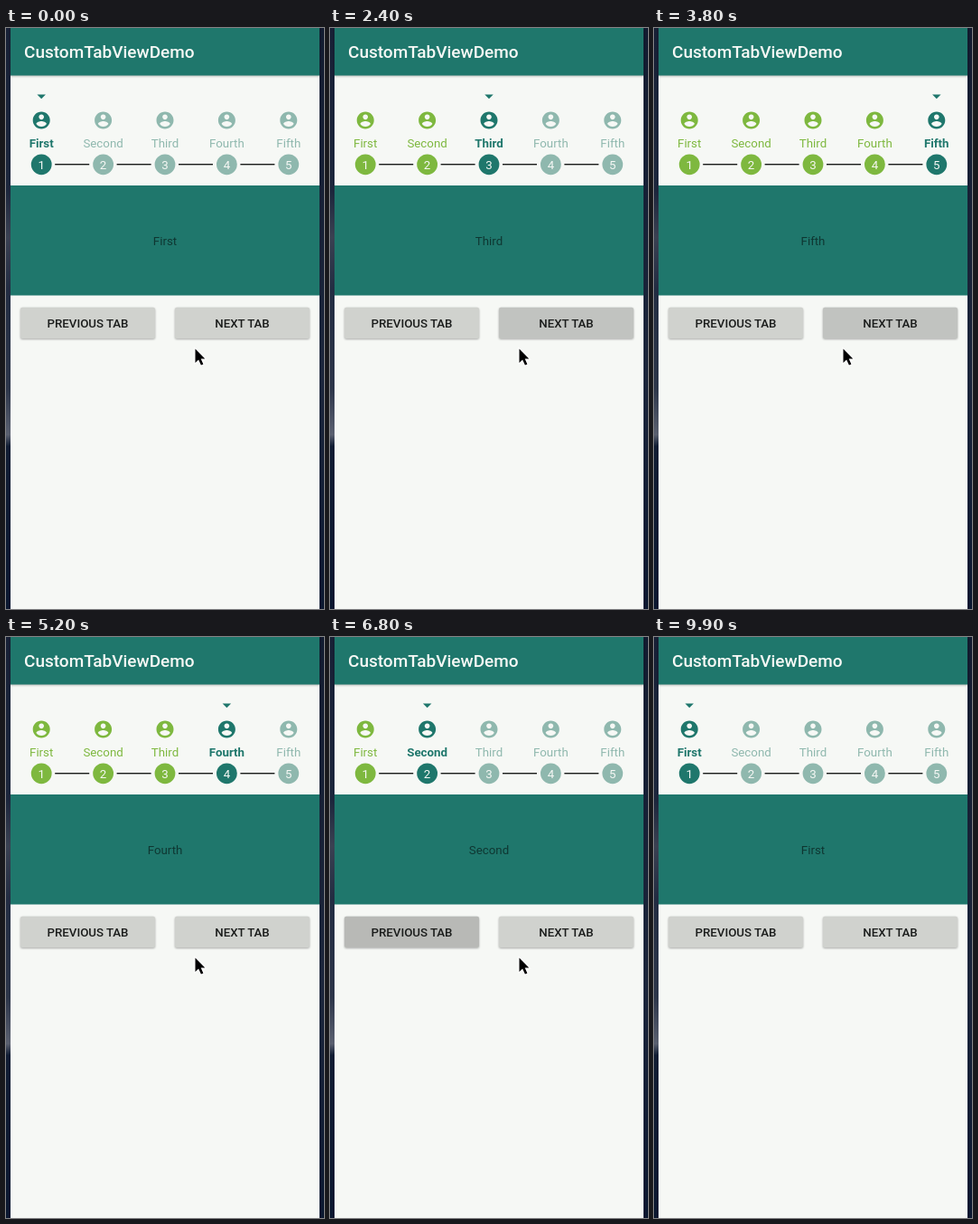
These frames come from a looping animation (352 by 642 pixels, 10 s). An HTML page:

```html
<!DOCTYPE html>
<html lang="en">
<head>
<meta charset="utf-8">
<title>Tab view demo</title>
<style>
html, body { margin: 0; width: 100%; height: 100%; overflow: hidden; background: #f6f8f5; }
svg { display: block; width: 352px; height: 642px; font: 13.3px Roboto, sans-serif; }
.mid { text-anchor: middle; }
.btn { filter: drop-shadow(0 1px 1px rgba(0,0,0,.32)); }
.btn.down { filter: drop-shadow(0 1px 2px rgba(0,0,0,.5)); }
.bar { filter: drop-shadow(0 1px 1px rgba(0,0,0,.25)); }
</style>
</head>
<body>
<svg id="stage" viewBox="0 0 352 642">
  <defs>
    <linearGradient id="left" x2="0" y2="1">
      <stop offset="0" stop-color="#172036"/>
      <stop offset=".28" stop-color="#1c263c"/>
      <stop offset=".36" stop-color="#3a4152"/>
      <stop offset=".45" stop-color="#222c42"/>
      <stop offset=".62" stop-color="#2c3549"/>
      <stop offset=".7" stop-color="#5a6070"/>
      <stop offset=".72" stop-color="#101c33"/>
      <stop offset="1" stop-color="#0a1730"/>
    </linearGradient>
    <linearGradient id="right" x2="0" y2="1">
      <stop offset="0" stop-color="#121b30"/>
      <stop offset=".6" stop-color="#1b253b"/>
      <stop offset="1" stop-color="#0a1730"/>
    </linearGradient>
  </defs>
  <rect width="5" height="642" fill="url(#left)"/>
  <rect x="347" width="5" height="642" fill="url(#right)"/>
  <rect x="5" width="342" height="642" fill="#f6f8f5"/>
  <rect class="bar" x="5" width="342" height="52.5" fill="#1f776c"/>
  <text x="20" y="33.3" font-size="19" font-weight="500" fill="#f6f8f5">CustomTabViewDemo</text>
  <rect x="5" y="174" width="342" height="121.5" fill="#1f776c"/>
</svg>
<script>
const stage = document.getElementById('stage');
const TABS = ['First', 'Second', 'Third', 'Fourth', 'Fifth'];
const ACTIVE = '#1f776c', DONE = '#7eb83f', TODO = '#8fb8ae', PAPER = '#f6f8f5';
const ICON = 'M12 2C6.48 2 2 6.48 2 12s4.48 10 10 10 10-4.48 10-10S17.52 2 12 2z' +
  'm0 3c1.66 0 3 1.34 3 3s-1.34 3-3 3-3-1.34-3-3 1.34-3 3-3z' +
  'm0 14.2c-2.5 0-4.71-1.28-6-3.22.03-1.99 4-3.08 6-3.08 1.99 0 5.97 1.09 6 3.08-1.29 1.94-3.5 3.22-6 3.22z';

// Press times; +1 is the next button, -1 the previous one
const PRESSES = [[1300, 1], [2000, 1], [2700, 1], [3400, 1],
  [4600, -1], [5900, -1], [6500, -1], [7100, -1]];
const LOOP = 10000, CLICK_DELAY = 150, CURSOR_END = 7000;

function add(tag, attrs, text, parent = stage) {
  const el = document.createElementNS('http://www.w3.org/2000/svg', tag);
  for (const key in attrs) el.setAttribute(key, attrs[key]);
  if (text) el.textContent = text;
  return parent.appendChild(el);
}

const tabX = i => 39.2 + 68.4 * i;
const tabs = TABS.map((name, i) => {
  const x = tabX(i), g = add('g', { class: 'mid' });
  add('path', { d: ICON, transform: `translate(${x - 11.4} 90.7) scale(.95)` }, '', g);
  const label = add('text', { x, y: 131.6 }, name, g);
  add('circle', { cx: x, cy: 150.8, r: 11.4 }, '', g);
  add('text', { x, y: 155.5, fill: PAPER }, String(i + 1), g);
  if (i) add('rect', { x: x - 53.4, y: 150, width: 38, height: 1.4, fill: '#1a1c1b' });
  return { g, label };
});
const arrow = add('path', { d: 'M-4.75 73.6h9.5L0 78.3z', fill: ACTIVE });
const caption = add('text', { class: 'mid', x: 176, y: 240.4, fill: '#000', 'fill-opacity': .54 });

function makeButton(x, name, dir) {
  const id = 'clip' + x, box = { x, y: 308.7, width: 149, height: 34.3, rx: 2 };
  add('rect', box, '', add('clipPath', { id }));
  const face = add('rect', { ...box, class: 'btn', fill: '#d0d2ce' });
  const clip = add('g', { 'clip-path': `url(#${id})` });
  const ripple = add('circle', { cy: 326 }, '', clip);
  add('text', { class: 'mid', x: x + 74.5, y: 331, 'font-weight': 500, fill: '#1b1d1c' }, name);
  return { face, ripple, dir, mid: x + 74.5 };
}
const buttons = [makeButton(16, 'PREVIOUS TAB', -1), makeButton(187, 'NEXT TAB', 1)];

const cursor = add('path', {
  d: 'M209.5 354.6v15.4l3.6-3.4 2.8 6 2.5-1.1-2.7-5.9h4.6z',
  stroke: '#fff', 'stroke-width': 2, 'paint-order': 'stroke'
});

function drawButton(b, t) {
  const press = PRESSES.filter(p => p[1] === b.dir && p[0] <= t).pop();
  const age = press ? t - press[0] : LOOP;
  const p = Math.min(1, age / 300);
  b.ripple.setAttribute('cx', b.mid - 45 * (1 - p));
  b.ripple.setAttribute('r', 77 * (1 - (1 - p) ** 2));
  b.ripple.setAttribute('opacity', .14 * Math.max(0, Math.min(1, (550 - age) / 300)));
  b.face.classList.toggle('down', age < 250);
}

function draw(t) {
  const current = PRESSES.reduce((n, [at, dir]) => t >= at + CLICK_DELAY ? n + dir : n, 0);
  tabs.forEach(({ g, label }, i) => {
    g.setAttribute('fill', i < current ? DONE : i > current ? TODO : ACTIVE);
    label.setAttribute('font-weight', i === current ? 700 : 400);
  });
  arrow.setAttribute('transform', `translate(${tabX(current)} 0)`);
  caption.textContent = TABS[current];
  buttons.forEach(b => drawButton(b, t));
  cursor.setAttribute('visibility', t < CURSOR_END ? 'visible' : 'hidden');
}

function tick() {
  draw(performance.now() % LOOP);
  requestAnimationFrame(tick);
}
tick();
</script>
</body>
</html>
```
